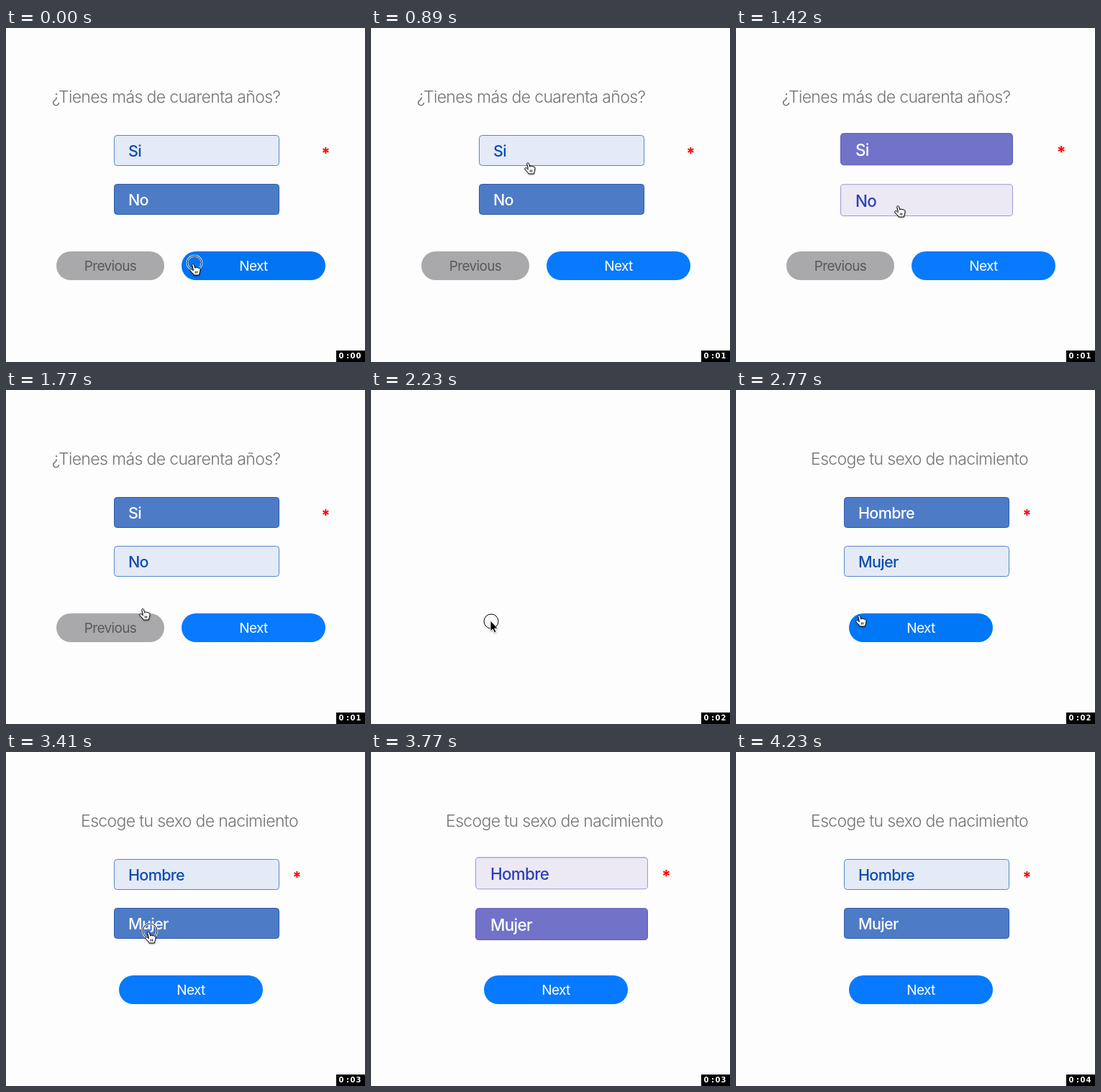
An HTML page for the animation above (4760 ms loop, 499 px wide and 465 px high).

```html
<!DOCTYPE html>
<html lang="es">
<head>
<meta charset="utf-8">
<title>Encuesta</title>
<style>
  html, body { margin: 0; width: 100%; height: 100%; overflow: hidden; background: #fdfdfd; }
  svg { display: block; width: 499px; height: 465px; font-family: Inter, "Open Sans", sans-serif; font-optical-sizing: none; letter-spacing: -.04em; }
  .title { font-size: 23px; font-weight: 300; fill: #747474; text-anchor: middle; }
  .option rect {
    fill: color-mix(in srgb, #ece9f5 var(--pulse), #e4eaf6);
    stroke: color-mix(in srgb, #9a98d6 var(--pulse), #5587c9);
  }
  .option text {
    font-size: 21.5px; font-weight: 500;
    fill: color-mix(in srgb, #2f3fb8 var(--pulse), #0b4bb0);
  }
  .option.on rect {
    fill: color-mix(in srgb, #7272c8 var(--pulse), #4d7bc6);
    stroke: color-mix(in srgb, #5c5cc0 var(--pulse), #2c5aab);
  }
  .option.on text { fill: #fff; }
  .star { font-size: 22px; font-weight: 700; fill: #f00; text-anchor: middle; letter-spacing: 0; }
  .button text { font-size: 19px; font-weight: 400; text-anchor: middle; }
  .next rect { fill: #077aff; }
  .next text { fill: #fff; }
  .next.hover rect { fill: #0077f6; }
  .next.press rect { fill: #0074f1; }
  .previous rect { fill: #a9a9ab; }
  .previous text { fill: #59595b; }
  .previous.hover rect { fill: #a1a1a3; }
  #clock text { font: bold 10px "DejaVu Sans", sans-serif; letter-spacing: 0; fill: #fff; }
  #hand, #arrow { filter: drop-shadow(0 1px 1px rgba(0, 0, 0, .35)); }
</style>
</head>
<body>
<svg viewBox="0 0 499 465">
  <g id="pages"></g>
  <g id="cursor">
    <g id="ring" fill="none">
      <circle r="10" stroke="#fff" stroke-width="2.6"/>
      <circle r="10" stroke="#000"/>
    </g>
    <path id="hand" fill="#fff" stroke="#000" stroke-linejoin="round"
      d="M-1.6 9.6L-3.2 3.3C-3.6 1.4-1.1.9-.6 2.7L.8 7.2C1 5.6 3.4 5.7 3.6 7.2 4 6 6 6.2 6.1 7.8 6.7 6.9 8 7.4 8 8.8 8.2 12.3 6.8 13.4 6.5 17H-.9C-1.5 14.6-4 13.4-6 10.8-7.1 9.2-5.1 7.8-3.6 9.1L-1.2 11.2M1.4 11.5V14.5M3.5 11.5V14.5"/>
    <path id="arrow" fill="#000" stroke="#fff"
      d="M-1-1V14L2.3 10.9 4.6 16 7 15 4.8 10H9.4Z"/>
  </g>
  <g id="clock">
    <rect x="459" y="449" width="40" height="16"/>
    <text x="462.5 473 478.5 486.5" y="460"></text>
  </g>
</svg>
<script>
const LOOP = 4760;
const $ = id => document.getElementById(id);

const option = (label, y) => `<g class="option">
  <rect x="150.5" y="${y + .5}" width="229" height="42" rx="4"/>
  <text x="170" y="${y + 30}">${label}</text></g>`;

const button = (kind, label, x, width) => `<g class="button ${kind}">
  <rect x="${x}" y="311" width="${width}" height="40" rx="20"/>
  <text x="${x + width / 2}" y="338">${label}</text></g>`;

const page = (title, center, labels, starX, buttons) => `<g class="page">
  <text class="title" x="${center}" y="104">${title}</text>
  <g class="choices">${option(labels[0], 149)}${option(labels[1], 217)}
    <text class="star" x="${starX}" y="182">*</text></g>
  ${buttons}</g>`;

$("pages").innerHTML =
  page("¿Tienes más de cuarenta años?", 222.5, ["Si", "No"], 444.5,
    button("previous", "Previous", 70, 150) + button("next", "Next", 244, 200)) +
  page("Escoge tu sexo de nacimiento", 255, ["Hombre", "Mujer"], 404.5,
    button("next", "Next", 157, 200));

// Each step lists only what changes; the rest carries over.
const steps = [
  { at: 0, page: 0, chosen: 1, pulse: 0, next: "press", previous: "", cursor: "hand", x: 262, y: 327, ring: true, clock: 0 },
  { at: 180, next: "hover" },
  { at: 360, y: 307, ring: false },
  { at: 540, x: 223, y: 189, next: "" },
  { at: 720, x: 220, y: 186 },
  { at: 890, clock: 1 },
  { at: 1070, chosen: 0, ring: true },
  { at: 1240, ring: false },
  { at: 1420, pulse: 1, x: 227, y: 246 },
  { at: 1590, pulse: .7, x: 209, y: 286 },
  { at: 1770, pulse: 0, x: 192, y: 303 },
  { at: 1950, x: 167, y: 322, previous: "hover" },
  { at: 2050, clock: 2 },
  { at: 2230, page: -1, cursor: "arrow", ring: true },
  { at: 2410, ring: false },
  { at: 2770, page: 1, chosen: 0, cursor: "hand", x: 173, y: 312, next: "hover", previous: "" },
  { at: 2950, x: 196, y: 274, next: "" },
  { at: 3050, clock: 3 },
  { at: 3230, x: 200, y: 249 },
  { at: 3410, chosen: 1, ring: true },
  { at: 3590, ring: false },
  { at: 3770, pulse: 1, cursor: "" },
  { at: 3950, pulse: 1.1 },
  { at: 4130, pulse: .4, clock: 4 },
  { at: 4230, pulse: 0 },
];
steps.forEach((step, i) => { steps[i] = { ...steps[i - 1], ...step }; });

const show = (node, visible) => { node.style.display = visible ? "" : "none"; };
const pages = [...document.querySelectorAll(".page")];

function draw(state) {
  pages.forEach((node, i) => {
    show(node, i === state.page);
    node.style.setProperty("--pulse", Math.min(100, state.pulse * 100) + "%");
    node.querySelectorAll(".option").forEach((item, j) => item.classList.toggle("on", j === state.chosen));
    node.querySelector(".choices").setAttribute("transform",
      `translate(265 211) scale(${1 + .043 * state.pulse}) translate(-265 -211)`);
    for (const kind of ["next", "previous"])
      node.querySelector("." + kind)?.setAttribute("class", `button ${kind} ${state[kind]}`);
  });
  $("cursor").setAttribute("transform", `translate(${state.x} ${state.y})`);
  show($("hand"), state.cursor === "hand");
  show($("arrow"), state.cursor === "arrow");
  show($("ring"), state.ring);
  $("clock").querySelector("text").textContent = "0:0" + state.clock;
}

const start = performance.now();
let current;
function tick() {
  const time = (performance.now() - start) % LOOP;
  const state = steps.findLast(step => step.at <= time);
  if (state !== current) draw(current = state);
  requestAnimationFrame(tick);
}
tick();
</script>
</body>
</html>
```
